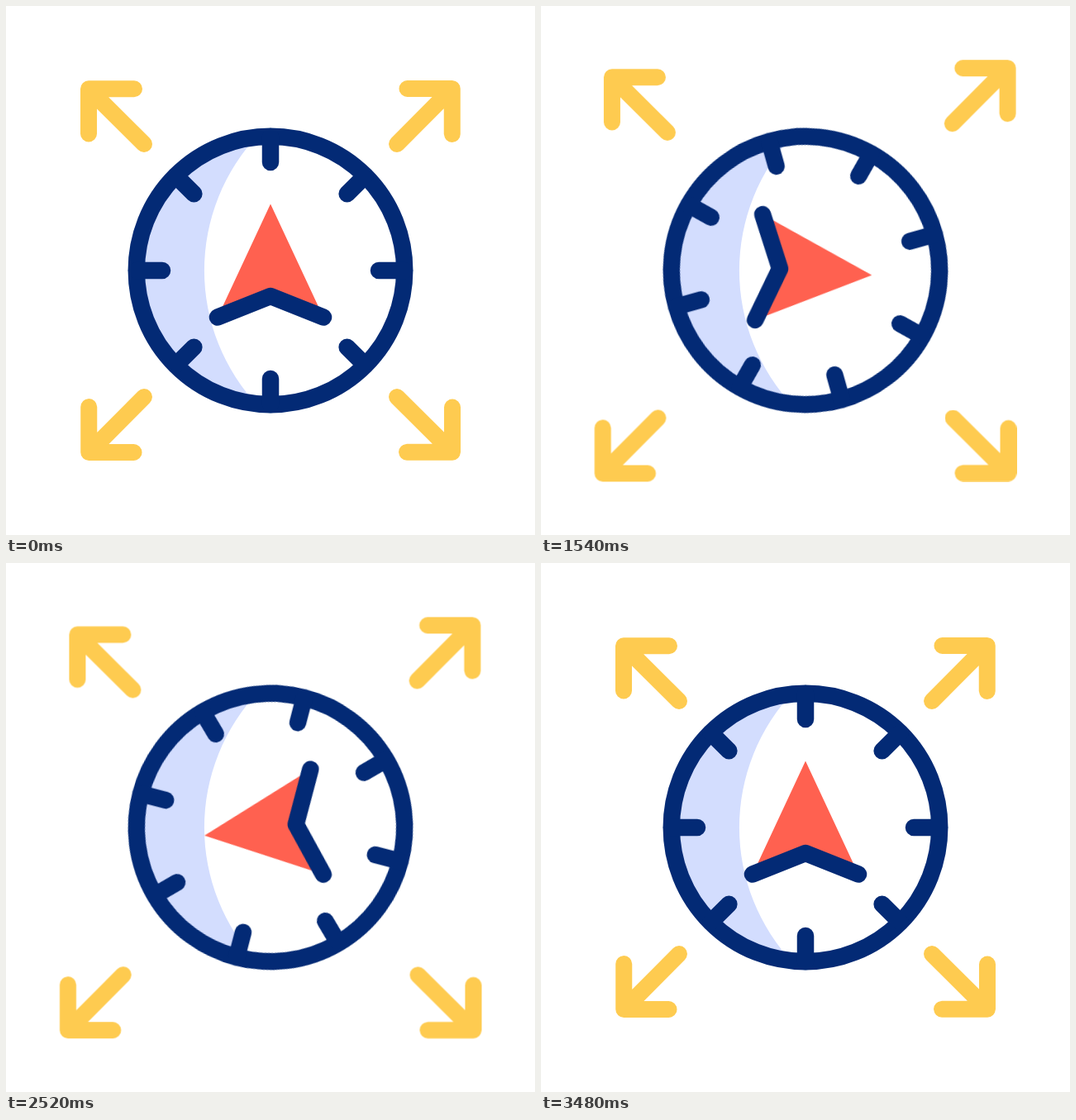
Animation, 640 px wide and 640 px high, one loop 3600 ms. Source, as an HTML page:

```html
<!DOCTYPE html>
<html lang="en">
<head>
<meta charset="utf-8">
<title>Compass</title>
<style>
  html, body { margin: 0; width: 100%; height: 100%; overflow: hidden; background: #fff; }
  svg { display: block; width: 100%; height: 100%; }
  .line { fill: none; stroke: #032a75; stroke-width: 20.5; stroke-linecap: round; stroke-linejoin: round; }
  .arrow { fill: none; stroke: #fecb50; stroke-width: 20; stroke-linecap: round; stroke-linejoin: round; }
  .arrow, .dial, .needle { animation: 3600ms linear infinite; }
  .arrow { animation-name: push; animation-delay: calc(var(--i) * 83ms); }
  .dial, .needle { transform-origin: 320px 320px; animation-name: swing; }
  .dial { --a: -15.8deg; --b: 14.6deg; }
  .needle { --a: 95deg; --b: -97deg; }

  /* two pushes outward; the first return is cut short by the second push */
  @keyframes push {
    0% { transform: translate(0, 0); }
    16.67% { transform: translate(0, 0); animation-timing-function: cubic-bezier(.333, 0, 0, 1); }
    32.22% { transform: translate(-25.5px, -25.5px); }
    39.25% { transform: translate(-25.5px, -25.5px); animation-timing-function: cubic-bezier(.426, 0, .107, .8); }
    49.9% { transform: translate(0, 0); }
    50% { transform: translate(0, 0); animation-timing-function: cubic-bezier(.333, 0, 0, 1); }
    65.56% { transform: translate(-25.5px, -25.5px); }
    66.3% { transform: translate(-25.5px, -25.5px); animation-timing-function: cubic-bezier(.333, 0, 0, 1); }
    81.86%, 100% { transform: translate(0, 0); }
  }

  @keyframes swing {
    0% { transform: rotate(0deg); }
    16.95% { transform: rotate(0deg); animation-timing-function: cubic-bezier(.75, 0, .25, 1); }
    37.83% { transform: rotate(var(--a)); }
    40.53% { transform: rotate(var(--a)); animation-timing-function: cubic-bezier(.667, 0, .333, 1); }
    69.44% { transform: rotate(var(--b)); animation-timing-function: cubic-bezier(.62, 0, .3, 1); }
    96.2%, 100% { transform: rotate(0deg); }
  }
</style>
</head>
<body>
<svg viewBox="0 0 640 640">
  <defs>
    <path id="arrow" d="M100 154.5V100.3H155M100 100.3L167 167"/>
    <path id="ticks" d="M320 158V189M320 482V451M158 320H189M482 320H451"/>
  </defs>

  <g><use class="arrow" href="#arrow" style="--i:0"/></g>
  <g transform="rotate(90 320 320)"><use class="arrow" href="#arrow" style="--i:1"/></g>
  <g transform="rotate(180 320 320)"><use class="arrow" href="#arrow" style="--i:2"/></g>
  <g transform="rotate(270 320 320)"><use class="arrow" href="#arrow" style="--i:3"/></g>

  <path fill="#d3ddfe" d="M306 155A239 239 0 0 0 306 485A165.6 165.6 0 0 1 306 155Z"/>

  <g class="dial line">
    <circle cx="320" cy="320" r="162.2"/>
    <use href="#ticks"/>
    <use href="#ticks" transform="rotate(45 320 320)"/>
  </g>

  <g class="needle">
    <path fill="#ff6150" d="M320 239.5L380 368L320 351L260 368Z"/>
    <path class="line" d="M256 376.5L320 351L384 376.5"/>
  </g>
</svg>
</body>
</html>
```
